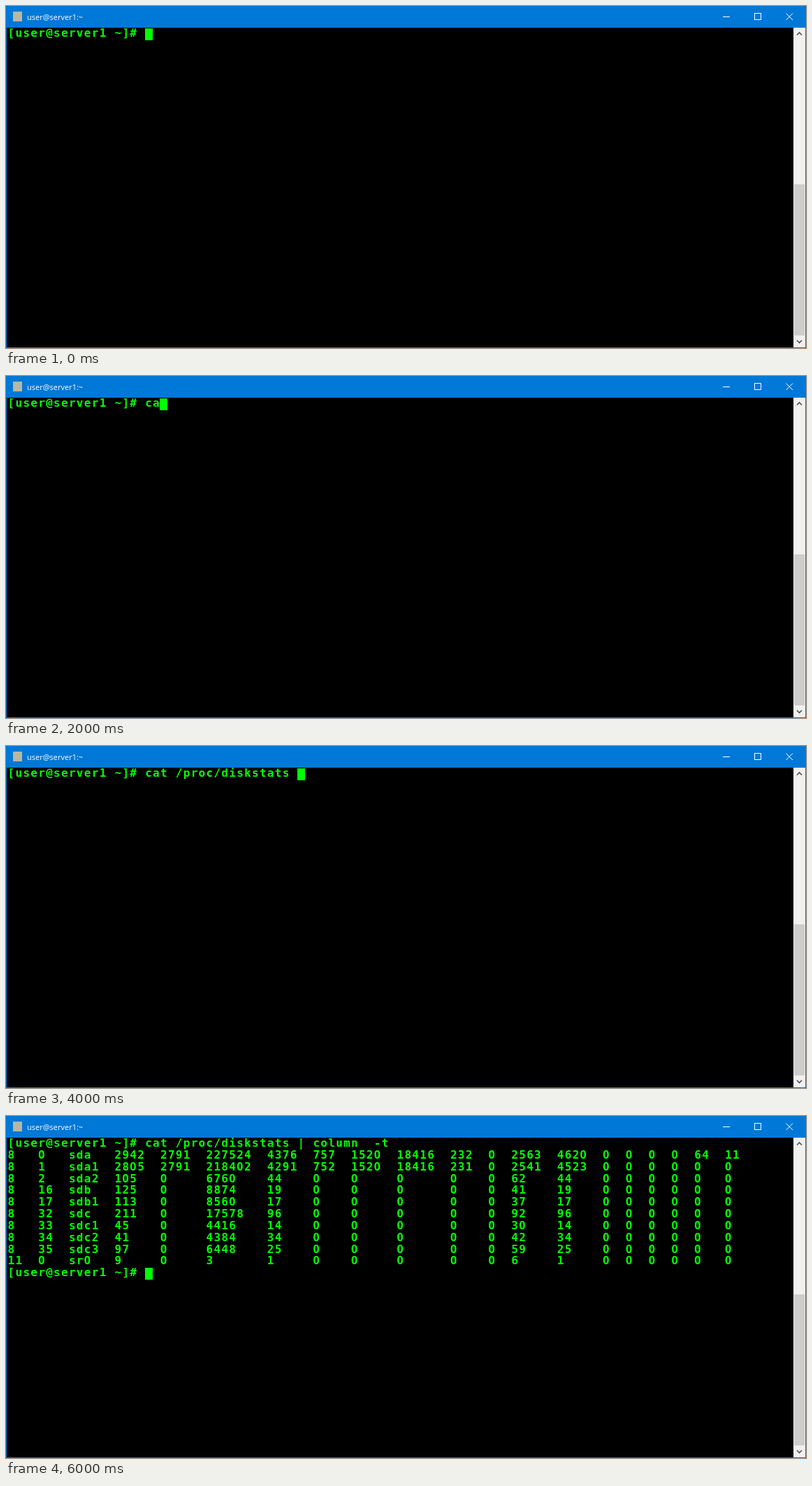
Recreate the animation shown at these times as an HTML page. Size 1145x489 px, loop 7000 ms.

```html
<!DOCTYPE html>
<html lang="en">
<head>
<meta charset="utf-8">
<title>Terminal</title>
<style>
  html, body { margin: 0; width: 100%; height: 100%; overflow: hidden; background: #000; }
  body { --cell: 10.92px; --row: 16.84px; }
  svg, pre, #title, #cursor { position: absolute; margin: 0; }
  svg { left: 0; top: 0; }
  #title { left: 30px; top: 7px; font: 11px/17px "Open Sans", sans-serif; color: #fff; }
  pre {
    left: 2.6px; top: 31px; color: #0f0;
    font: bold 16px/var(--row) "DejaVu Sans Mono", monospace;
    letter-spacing: calc(var(--cell) - 1ch);
  }
  /* plain zero without the inner mark */
  pre i {
    display: inline-block; width: var(--cell); line-height: 0; letter-spacing: 0;
    font-family: "Noto Sans", sans-serif; font-style: normal;
  }
  #cursor { width: 11px; height: 17px; background: #0f0; }
</style>
</head>
<body>
<svg width="1145" height="489" fill="none" shape-rendering="crispEdges">
  <path d="M.5 0V488.5H1144.5V0" stroke="#0078d7"/>
  <path d="M0 0H1145V31H0Z" fill="#0078d7"/>
  <path d="M10 8H23V22H10Z" fill="#b8b8a0"/>
  <path d="M1026 15.5H1036M1071.5 10.5H1080.5V19.5H1071.5Z" stroke="#fff"/>
  <path d="M1116.5 10.5L1126 20M1126 10.5L1116.5 20" stroke="#fff" shape-rendering="auto"/>
  <path d="M1127 31H1144V488H1127Z" fill="#f0f0f0"/>
  <path d="M1128 255H1143V471H1128Z" fill="#cdcdcd"/>
  <path d="M1132 41.5L1135.5 38L1139 41.5M1132 478L1135.5 481.5L1139 478"
        stroke="#505050" stroke-width="1.6" shape-rendering="auto"/>
</svg>
<div id="title">user@server1:~</div>
<pre id="screen"></pre>
<div id="cursor"></div>
<script>
const CELL = 10.92, ROW = 16.84, STEP = 1000;
const screenEl = document.getElementById('screen');
const cursor = document.getElementById('cursor');

// A device that has only been read: all write counters are zero.
const readOnly = (major, minor, name, reads, sectors, ms, busy) =>
  [major, minor, name, reads, 0, sectors, ms, 0, 0, 0, 0, 0, busy, ms, 0, 0, 0, 0, 0, 0];

const stats = [
  '8 0 sda 2942 2791 227524 4376 757 1520 18416 232 0 2563 4620 0 0 0 0 64 11'.split(' '),
  '8 1 sda1 2805 2791 218402 4291 752 1520 18416 231 0 2541 4523 0 0 0 0 0 0'.split(' '),
  readOnly(8, 2, 'sda2', 105, 6760, 44, 62),
  readOnly(8, 16, 'sdb', 125, 8874, 19, 41),
  readOnly(8, 17, 'sdb1', 113, 8560, 17, 37),
  readOnly(8, 32, 'sdc', 211, 17578, 96, 92),
  readOnly(8, 33, 'sdc1', 45, 4416, 14, 30),
  readOnly(8, 34, 'sdc2', 41, 4384, 34, 42),
  readOnly(8, 35, 'sdc3', 97, 6448, 25, 59),
  readOnly(11, 0, 'sr0', 9, 3, 1, 6)
];

function columns(rows) {
  const widths = rows[0].map((_, i) => Math.max(...rows.map(r => String(r[i]).length)) + 2);
  return rows.map(r => r.map((v, i) => String(v).padEnd(widths[i])).join('').trimEnd()).join('\n');
}

const prompt = '[user@server1 ~]# ';
const command = 'cat /proc/diskstats | column  -t';
const typed = [0, 1, 2, 4, 20, command.length];
const states = typed.map(n => prompt + command.slice(0, n));
states.push([prompt + command, columns(stats), prompt].join('\n'));

let shown = -1;
function draw(now) {
  const i = Math.floor(now / STEP) % states.length;
  if (i !== shown) {
    shown = i;
    const lines = states[i].split('\n');
    screenEl.innerHTML = states[i].replace(/0/g, '<i>0</i>');
    cursor.style.left = Math.round(2 + CELL * lines.at(-1).length) + 'px';
    cursor.style.top = Math.round(32 + ROW * (lines.length - 1)) + 'px';
  }
}

const start = performance.now();
function tick() {
  draw(performance.now() - start);
  requestAnimationFrame(tick);
}
tick();
</script>
</body>
</html>
```
